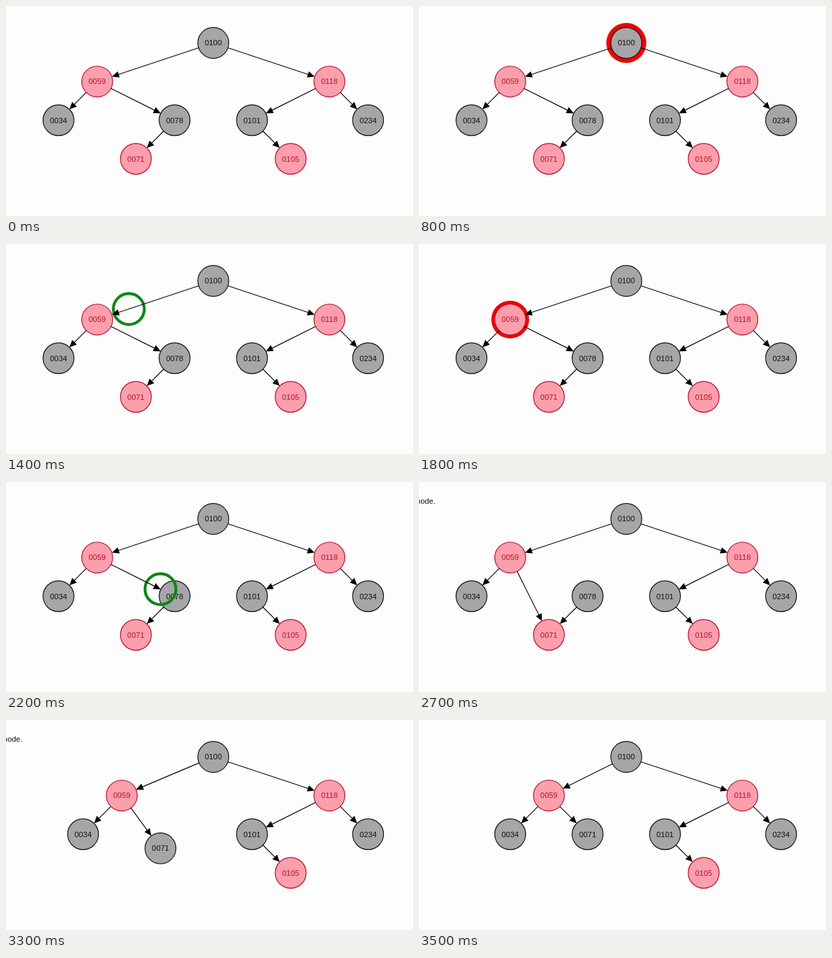
An HTML page with a canvas for the animation above (4000 ms loop, 600 by 310 pixels).

```html
<!DOCTYPE html>
<html lang="en">
<head>
<meta charset="utf-8">
<title>Tree deletion</title>
<style>
html, body { margin: 0; width: 100%; height: 100%; overflow: hidden; background: #fefdfe; }
canvas { display: block; }
</style>
</head>
<body>
<canvas id="stage" width="600" height="310"></canvas>
<script>
const ctx = document.getElementById('stage').getContext('2d');
const LOOP = 4000, TICK = 100, MOVE = 367;
const UNIT = 57.05, RADIUS = 22.8;
const FONT = '11.4px "Liberation Sans", Arial, sans-serif';
const BLACK = { fill: '#a6a5a7', line: '#111111' };
const RED = { fill: '#fa9fab', line: '#b90f32' };

const col = c => 77.4 + c * UNIT;
const row = r => 54.5 + r * UNIT;
const mix = (a, b, p) => a + (b - a) * p;
const progress = (t, start) => Math.min(1, Math.max(0, (t - start) / MOVE));

// Grid places before and after the deletion
const nodes = {
  '0100': { from: [4, 0] },
  '0059': { from: [1, 1], to: [2, 1], red: true },
  '0118': { from: [7, 1], red: true },
  '0034': { from: [0, 2], to: [1, 2] },
  '0078': { from: [3, 2] },
  '0101': { from: [5, 2] },
  '0234': { from: [8, 2] },
  '0071': { from: [2, 3], to: [3, 2], red: true },
  '0105': { from: [6, 3], red: true }
};
const fixedEdges = [
  ['0100', '0059'], ['0100', '0118'], ['0059', '0034'],
  ['0118', '0101'], ['0118', '0234'], ['0101', '0105']
];
const halos = [
  { id: '0100', start: 800, end: 1200 },
  { id: '0059', start: 1600, end: 1900 },
  { id: '0078', start: 2300, end: 2700 }
];
const rings = [
  { a: '0100', b: '0059', start: 1133, end: 1600 },
  { a: '0059', b: '0078', start: 1900, end: 2300 }
];
const RELINK = 2700, SHIFT = 3067, DONE = 3500;

function active(list, t) {
  return list.find(s => t >= s.start && t < s.end);
}

function place(id, t) {
  const { from, to = from } = nodes[id];
  const p = progress(t, SHIFT);
  return { x: col(mix(from[0], to[0], p)), y: row(mix(from[1], to[1], p)) };
}

function circle(x, y, r) {
  ctx.beginPath();
  ctx.arc(x, y, r, 0, Math.PI * 2);
}

function haloRadius(t) {
  const phase = ((t - 800) / 467 + 0.71) % 1;
  return 26.2 + 5.7 * (1 - Math.abs(2 * phase - 1));
}

function drawNode(id, t) {
  const { x, y } = place(id, t);
  const red = nodes[id].red && !(id === '0071' && t >= SHIFT);
  const style = red ? RED : BLACK;
  circle(x, y, RADIUS);
  ctx.fillStyle = style.fill;
  ctx.fill();
  ctx.lineWidth = 1.2;
  ctx.strokeStyle = style.line;
  ctx.stroke();
  ctx.fillStyle = style.line;
  ctx.textAlign = 'center';
  ctx.fillText(id, x, y + 3.9);
}

function drawEdge(a, b, t) {
  const p = place(a, t), q = place(b, t);
  const angle = Math.atan2(q.y - p.y, q.x - p.x);
  const length = Math.hypot(q.x - p.x, q.y - p.y);
  const tip = length - RADIUS;
  ctx.save();
  ctx.translate(p.x, p.y);
  ctx.rotate(angle);
  ctx.strokeStyle = ctx.fillStyle = '#000';
  ctx.lineWidth = 1.15;
  ctx.beginPath();
  ctx.moveTo(RADIUS, 0);
  ctx.lineTo(tip - 4, 0);
  ctx.stroke();
  ctx.beginPath();
  ctx.moveTo(tip, 0);
  ctx.lineTo(tip - 10.6, -4.8);
  ctx.lineTo(tip - 10.6, 4.8);
  ctx.fill();
  ctx.restore();
}

function drawRing(ring, t) {
  const a = place(ring.a, t), b = place(ring.b, t);
  const p = progress(t, ring.start);
  circle(mix(a.x, b.x, p), mix(a.y, b.y, p), RADIUS);
  ctx.lineWidth = 4.2;
  ctx.strokeStyle = '#0a8712';
  ctx.stroke();
}

function draw(t) {
  ctx.fillStyle = '#fefdfe';
  ctx.fillRect(0, 0, 600, 310);
  ctx.font = FONT;

  const halo = active(halos, t);
  for (const id in nodes) {
    const gone = id === '0078' && t >= SHIFT;
    if (!gone && !(halo && halo.id === id)) drawNode(id, t);
  }
  if (halo) {
    const { x, y } = place(halo.id, t);
    circle(x, y, haloRadius(t));
    ctx.fillStyle = '#f00202';
    ctx.fill();
    drawNode(halo.id, t);
  }

  const ring = active(rings, t);
  if (ring) drawRing(ring, t);

  for (const [a, b] of fixedEdges) drawEdge(a, b, t);
  drawEdge('0059', t < RELINK ? '0078' : '0071', t);
  if (t < SHIFT) drawEdge('0078', '0071', t);

  if (t >= RELINK && t < DONE) {
    ctx.fillStyle = '#111';
    ctx.textAlign = 'right';
    ctx.fillText('deleted node.', 24.3, 32);
  }
}

const begin = performance.now();
function loop() {
  const t = (performance.now() - begin) % LOOP;
  draw(Math.floor(t / TICK) * TICK);
  requestAnimationFrame(loop);
}
loop();
</script>
</body>
</html>
```
